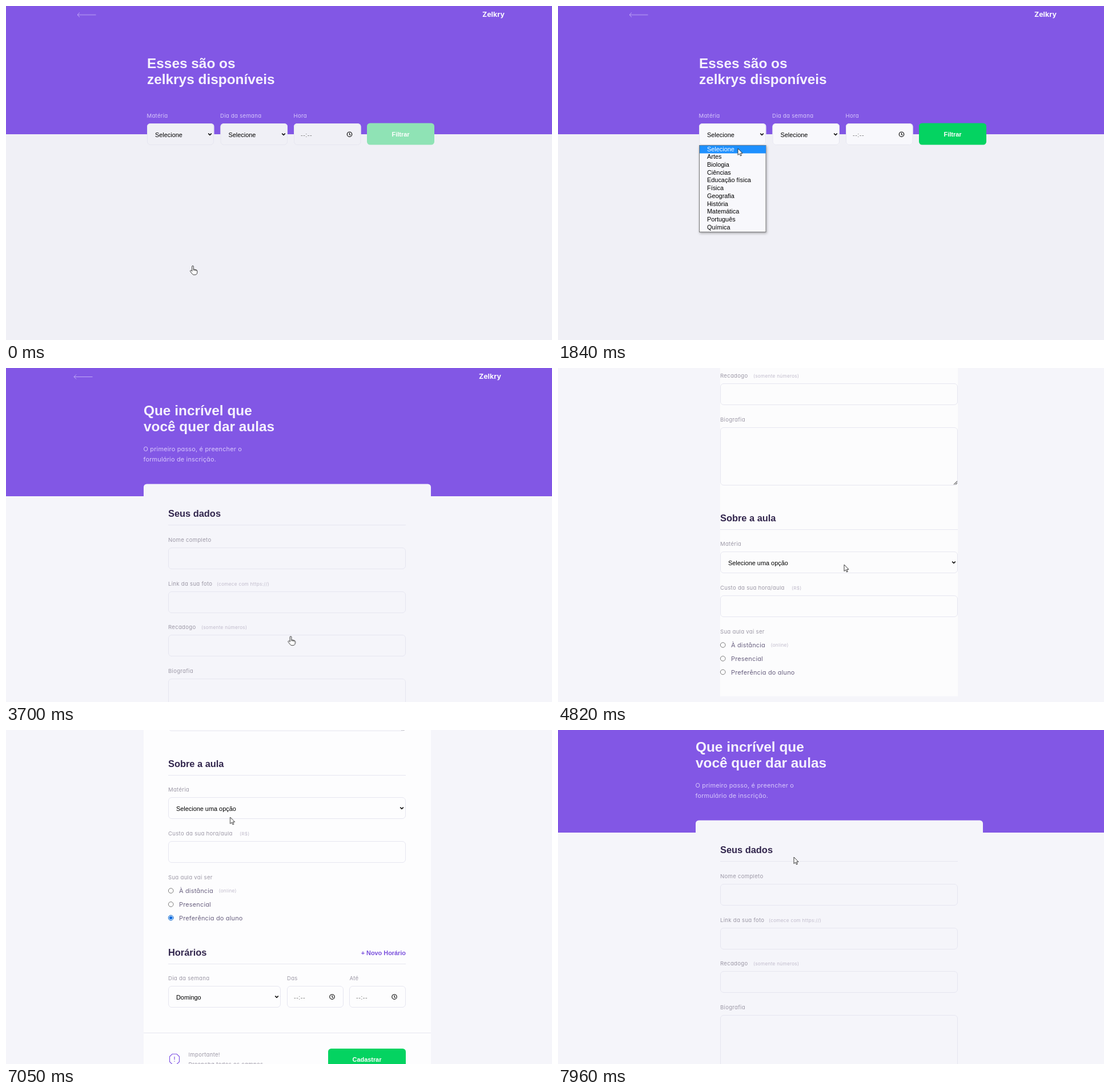
These frames come from a looping animation (956 px wide and 586 px high, 8000 ms). An HTML page:

```html
<!DOCTYPE html>
<html lang="pt-BR">
<head>
<meta charset="utf-8">
<title>Aulas</title>
<style>
html, body { margin: 0; width: 100%; height: 100%; overflow: hidden; background: #f0f0f6; }
svg { display: block; width: 100%; height: 100%; }

/* type */
text { font: 400 10.9px "Liberation Sans", Arial, sans-serif; }
.title { font-size: 24.4px; font-weight: 700; fill: #f6f2fd; }
.legend { font-size: 16.4px; font-weight: 700; fill: #32264d; }
.bold { font-weight: 700; fill: #fff; }
.mid { text-anchor: middle; }
.end { text-anchor: end; }
.cta { font-size: 13.6px; }
.link { fill: #7a50dc; }
.logo, .label, .lead, .option, .hint {
  font-family: Inter, "Open Sans", sans-serif;
  font-feature-settings: "cv11";
}
.logo { font-size: 12.4px; font-weight: 700; fill: #fbf9ff; }
.label { font-size: 9.55px; letter-spacing: .3px; fill: #9c98a6; }
.light, .lead { fill: #d8c8fb; }
.lead, .option { letter-spacing: .2px; }
.option { fill: #6a6180; }
.hint { font-size: 8.2px; letter-spacing: .28px; fill: #c1bccc; }
.time { letter-spacing: .5px; fill: #777; }
.picked { fill: #fff; }

/* parts */
.purple { fill: #8257e5; }
.green { fill: #04d361; }
.box { fill: none; stroke: #e6e6f0; }
.rule { stroke: #e6e6f0; }
.stroke { fill: none; stroke: #111; stroke-width: 1.2; }
.chevron { stroke-width: 1.6; }
.back { fill: none; stroke: #c0a9f6; }
.pointer { fill: #fff; stroke: #222; stroke-width: .9; stroke-linejoin: round; }

/* motion */
.run { animation: 8s linear infinite; }
.step { animation: 8s step-end infinite; opacity: 0; }
#list { animation-name: list; }
#home { animation-name: home; }
#form { animation-name: form; }
#menu { animation-name: menu; }
#hand { animation-name: hand; }
#arrow { animation-name: arrow; }
.patch { animation-name: patch; }
.dot { animation-name: dot; }
#row { animation-name: row; }
#cursor { animation-name: cursor; animation-timing-function: ease-in-out; }
.scroll { animation-name: scroll; animation-timing-function: ease-in-out; }
.field { animation-name: field; }
.filter { animation-name: filter; }
.leave { animation-name: leave; }
.teach { animation-name: teach; }
.card { animation: card 8s step-end infinite; }

@keyframes list { 0% { opacity: 1 } 34.125% { opacity: 0 } }
@keyframes home { 0% { opacity: 0 } 34.125% { opacity: 1 } 46.25% { opacity: 0 } }
@keyframes form { 0% { opacity: 0 } 46.25% { opacity: 1 } 100% { opacity: 1 } }
@keyframes menu { 0% { opacity: 0 } 16.5% { opacity: 1 } 29.875% { opacity: 0 } }
@keyframes hand {
  0% { opacity: 1 } .5% { opacity: 0 } 29.875% { opacity: 1 }
  34.125% { opacity: 0 } 41.5% { opacity: 1 } 49.75% { opacity: 0 }
}
@keyframes arrow {
  0% { opacity: 0 } .5% { opacity: 1 } 29.875% { opacity: 0 }
  34.125% { opacity: 1 } 41.5% { opacity: 0 } 49.75%, 100% { opacity: 1 }
}
@keyframes patch { 0% { opacity: 0 } 59.875% { opacity: 1 } 69.9% { opacity: 0 } }
@keyframes dot { 0% { opacity: 0 } 74.5%, 100% { opacity: 1 } }
@keyframes card {
  0% { fill: #f5f5fa } 69.9% { fill: #fdfdfe } 96.5%, 100% { fill: #f5f5fa }
}
@keyframes field { 0%, .375% { fill: #f0f0f6 } 2.9%, 100% { fill: #f8f8fc } }
@keyframes filter { 0%, .375% { fill: #8fe3b5 } 2.9%, 100% { fill: #04d361 } }
@keyframes leave { 0%, 29.875% { opacity: 1 } 32.4%, 100% { opacity: .6 } }
@keyframes teach { 0%, 41.5% { fill: #04d361 } 42.9%, 100% { fill: #04bf58 } }
@keyframes row {
  0% { transform: none }
  18.7% { transform: translateY(0); animation-timing-function: steps(10) }
  19.8% { transform: translateY(137.2px) }
  21.3% { transform: translateY(137.2px); animation-timing-function: steps(10) }
  22.7%, 100% { transform: translateY(0) }
}
@keyframes scroll {
  0%, 49.75% { transform: translateY(0) }
  59.6%, 60.25% { transform: translateY(-441px) }
  69.9%, 91.875% { transform: translateY(-645px) }
  94.375%, 94.7% { transform: translateY(-404px) }
  99.5%, 100% { transform: translateY(-45px) }
}
@keyframes cursor {
  0%, .375% { transform: translate(327px, 456px) }
  5% { transform: translate(277px, 448px) }
  10.5% { transform: translate(290px, 440px) }
  15.5%, 18.375% { transform: translate(306px, 232px) }
  20.5% { transform: translate(300px, 440px) }
  23%, 23.4% { transform: translate(315px, 250px) }
  27.6%, 34.125% { transform: translate(132px, 10px) }
  42.9%, 49.75% { transform: translate(498.5px, 471px) }
  58%, 60.6% { transform: translate(501px, 345px) }
  70.25% { transform: translate(501px, 329px) }
  74.4%, 75.6% { transform: translate(288px, 331px); animation-timing-function: linear }
  77% { transform: translate(243px, 250px); animation-timing-function: linear }
  78.8% { transform: translate(450px, 140px); animation-timing-function: linear }
  80.4% { transform: translate(676px, 220px); animation-timing-function: linear }
  82% { transform: translate(690px, 330px); animation-timing-function: linear }
  84.4% { transform: translate(500px, 368px); animation-timing-function: linear }
  86.5% { transform: translate(221px, 240px); animation-timing-function: linear }
  88.4% { transform: translate(420px, 139px) }
  90.4%, 94.7% { transform: translate(437.5px, 343.5px) }
  99.5%, 100% { transform: translate(413px, 223px) }
}
</style>
</head>
<body>
<svg id="stage" viewBox="0 0 956 586"></svg>
<script>
const text = (x, y, cls, str) => `<text x="${x}" y="${y}" class="${cls}">${str}</text>`;
const rect = (x, y, w, h, cls, r = 0) =>
  `<rect x="${x}" y="${y}" width="${w}" height="${h}" rx="${r}" class="${cls}"/>`;
const fill = (x, y, w, h, color, r = 0) =>
  `<rect x="${x}" y="${y}" width="${w}" height="${h}" rx="${r}" fill="${color}"/>`;
const path = (x, y, d, cls) => `<path transform="translate(${x} ${y})" d="${d}" class="${cls}"/>`;
const group = (attrs, ...parts) => `<g ${attrs}>${parts.join('')}</g>`;

const rule = (x, y, w) => path(x, y, `M0 0H${w}`, 'rule');
const chevron = (x, y) => path(x, y, 'M-2.8-1.4 0 1.4 2.8-1.4', 'stroke chevron');
const clock = (x, y) =>
  `<circle cx="${x}" cy="${y}" r="4.2" class="stroke"/>` + path(x, y, 'M0-2.8V0L1.8 1.6', 'stroke');
// y is the middle of the one-pixel top border
const box = (x, y, w, h = 37) => rect(x + .5, y, w - 1, h, 'box', 5.5);
const topBar = (x, cls = '') =>
  path(x, 15.5, 'M33.5 0H1M5-4 1 0 5 4', 'back ' + cls) + text(x + 710, 19, 'logo', 'Zelkry');
const title = (x, y, a, b) => text(x, y, 'title', a) + text(x, y + 28.5, 'title', b);
const select = (x, y, w, str) =>
  box(x, y, w) + text(x + 14, y + 23, '', str) + chevron(x + w - 7, y + 18.5);
const timeBox = (x, y, w) =>
  box(x, y, w) + text(x + 12, y + 23, 'time', '--:--') + clock(x + w - 20, y + 18.7);
const input = (y, label, hint = '', hintX = 0, h = 37) =>
  text(284, y - 10.5, 'label', label) + text(hintX, y - 10.5, 'hint', hint) + box(284, y, 416, h);
const radio = (y, label) =>
  `<circle cx="288.7" cy="${y}" r="4.3" fill="#fff" stroke="#777"/>` + text(303, y + 4, 'option', label);

const subjects = ['Selecione', 'Artes', 'Biologia', 'Ciências', 'Educação física', 'Física',
  'Geografia', 'História', 'Matemática', 'Português', 'Química'];
const options = cls => subjects.map((s, i) => text(261, 254.6 + i * 13.72, cls, s)).join('');

const list = group('id="list" class="step"',
  fill(0, 0, 956, 586, '#f0f0f6'),
  rect(0, 0, 956, 225, 'purple'),
  topBar(124, 'run leave'),
  title(247, 108.5, 'Esses são os', 'zelkrys disponíveis'),
  ...['Matéria', 'Dia da semana', 'Hora'].map((s, i) =>
    text(246.5 + i * 128.5, 196, 'label light', s) +
    rect(247 + i * 128.5, 206, 117.5, 38, 'run field', 5.5)),
  select(247, 206.5, 117, 'Selecione'),
  select(375.5, 206.5, 117.5, 'Selecione'),
  timeBox(504, 206.5, 117.5),
  rect(632, 205.5, 118, 38, 'run filter', 5.5),
  text(691, 228.5, 'bold mid', 'Filtrar'),
  group('id="menu" class="step"',
    `<rect x="247.5" y="244.5" width="116.5" height="152" fill="#f8f8fc" stroke="#777" filter="url(#shade)"/>`,
    options(''),
    group('clip-path="url(#pick)"', fill(248, 244, 116, 153, '#1e90ff'), options('picked'))));

const home = group('id="home" class="step"',
  rect(0, 0, 956, 586, 'purple'),
  fill(124, 442, 204.5, 71, '#9871f5', 5.5),
  rect(339.5, 442, 204.5, 71, 'run teach', 5.5),
  text(226, 482, 'bold cta mid', 'Estudar'),
  text(442, 482, 'bold cta mid', 'Dar aulas'));

const form = group('id="form" class="step"',
  fill(0, 0, 956, 586, '#f5f5fa'),
  group('class="run scroll"',
    rect(0, 0, 956, 225, 'purple'),
    rect(241, 203.5, 503, 1090, 'card', 5.5)),
  group('class="step patch"', fill(284, 0, 416, 576, '#fcfcfd')),
  group('class="run scroll"',
    topBar(118),
    title(241, 82.7, 'Que incrível que', 'você quer dar aulas'),
    text(240.5, 146, 'lead', 'O primeiro passo, é preencher o'),
    text(240.5, 164, 'lead', 'formulário de inscrição.'),

    text(284, 261, 'legend', 'Seus dados'),
    rule(284, 275.5, 416),
    input(315.5, 'Nome completo'),
    input(392.5, 'Link da sua foto', '(comece com https://)', 369),
    input(468.5, 'Recadogo', '(somente números)', 342),
    input(545.5, 'Biografia', '', 0, 101),
    group('opacity=".55"', path(699, 645.5, 'M-6 0 0-6M-3 0 0-3', 'stroke')),

    text(284, 709.8, 'legend', 'Sobre a aula'),
    rule(284, 724.5, 416),
    text(284, 753.3, 'label', 'Matéria'),
    select(284, 763.5, 416, 'Selecione uma opção'),
    input(840.5, 'Custo da sua hora/aula', '(R$)', 409),
    text(284, 906.8, 'label', 'Sua aula vai ser'),
    radio(927, 'À distância'),
    text(372.5, 930, 'hint', '(online)'),
    radio(950.8, 'Presencial'),
    radio(974.5, 'Preferência do aluno'),
    group('class="step dot"',
      '<circle cx="288.7" cy="974.5" r="4.3" fill="#fff" stroke="#0069e0"/>',
      '<circle cx="288.7" cy="974.5" r="2.8" fill="#0069e0"/>'),

    text(284, 1040.8, 'legend', 'Horários'),
    text(700, 1039.5, 'bold link end', '+ Novo Horário'),
    rule(284, 1055.5, 416),
    text(284, 1084.3, 'label', 'Dia da semana'),
    text(492, 1084.3, 'label', 'Das'),
    text(601.5, 1084.3, 'label', 'Até'),
    select(284, 1094.5, 197, 'Domingo'),
    timeBox(492, 1094.5, 99),
    timeBox(601, 1094.5, 99),

    rule(241, 1176.5, 503),
    path(295, 1222.5, 'M-4-9H4L8.5-4.5V4.5L4 9H-4L-8.5 4.5V-4.5ZM0-4.5V1M0 3.2V4.6',
      'stroke" style="stroke:#8257e5'),
    text(319.5, 1218.3, 'label', 'Importante!'),
    text(319.5, 1234.5, 'label', 'Preencha todos os campos'),
    rect(564, 1204, 136, 38, 'green', 5.5),
    text(632, 1227, 'bold mid', 'Cadastrar')));

const cursor = group('id="cursor" class="run"',
  group('id="arrow" class="step"',
    path(0, 0, 'M0 0V11.5L2.7 9 4.5 13 6.3 12.2 4.6 8.3H8Z', 'pointer')),
  group('id="hand" class="step"',
    path(0, 0, 'M-1.3 9.4V1.1a1.3 1.3 0 0 1 2.6 0V5.8L6 6.9q1.8.4 1.8 2.1V11.3q0 4.4-4.4 4.4H1.9' +
      'q-1.7 0-2.7-1.5L-4.4 9.6q-.6-1.3.6-1.8 1-.2 1.5.5ZM1.3 5.8V8.2M3.5 6.4V8.6M5.7 7V9', 'pointer')));

const defs = `<defs>
  <filter id="shade" x="-10%" y="-10%" width="120%" height="120%">
    <feDropShadow dx="1" dy="2" stdDeviation="2" flood-opacity=".3"/>
  </filter>
  <clipPath id="pick"><rect id="row" class="run" x="248" y="244.7" width="116" height="13.72"/></clipPath>
</defs>`;

document.getElementById('stage').innerHTML = defs + list + home + form + cursor;
</script>
</body>
</html>
```
